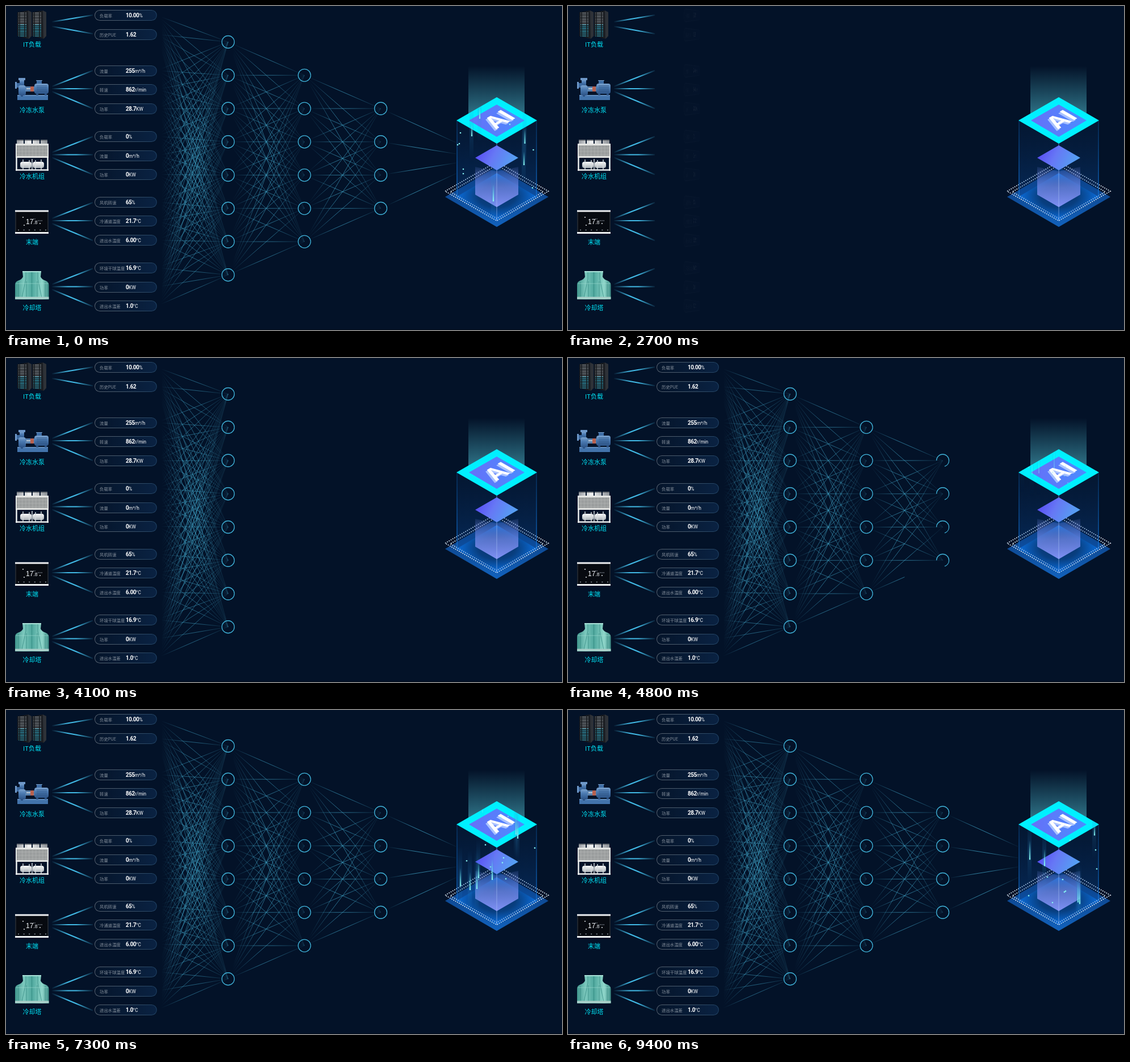
These frames come from a looping animation (980 px wide and 572 px high, 9500 ms). An HTML page:

```html
<!DOCTYPE html>
<html>
<head>
<meta charset="utf-8">
<style>
html, body { margin: 0; width: 100%; height: 100%; overflow: hidden; background: #031228; }
#stage { position: relative; width: 980px; height: 572px; overflow: hidden; }
svg { position: absolute; left: 0; top: 0; }
.pill {
  position: absolute; left: 156px; width: 108px; height: 17px; line-height: 17px;
  border: 1px solid transparent; border-radius: 10px; white-space: nowrap;
  background: linear-gradient(90deg, #05152b, #0a2242) padding-box,
              linear-gradient(90deg, #56616f, #44586b 50%, #1f4163) border-box;
}
.pill span { position: absolute; top: 0; }
.name { left: 8px; font: 300 7.4px/17px "Noto Sans CJK SC", "Noto Sans CJK", sans-serif; color: #87919d; }
.val { left: 54px; color: #fff; font: 700 10px/18px Roboto, sans-serif; letter-spacing: -.45px; }
.val i { font: 400 8.4px/18px Roboto, sans-serif; letter-spacing: 0; }
.cat { font: 500 11px "Noto Sans CJK SC", "Noto Sans CJK", sans-serif; fill: #00e3f6; text-anchor: middle; }
</style>
</head>
<body>
<div id="stage">
<svg id="art" width="980" height="572" viewBox="0 0 980 572">
  <defs>
    <linearGradient id="beam" x2="0" y2="1"><stop stop-color="#3a8ca0" stop-opacity="0"/><stop offset="1" stop-color="#3a8ca0" stop-opacity=".85"/></linearGradient>
    <linearGradient id="chip" x2="1" y2="0"><stop stop-color="#6670f8"/><stop offset="1" stop-color="#4a8cff"/></linearGradient>
    <linearGradient id="mid" x2="1" y2=".3"><stop stop-color="#5440f4"/><stop offset=".5" stop-color="#6678f5"/><stop offset="1" stop-color="#559ff2"/></linearGradient>
    <linearGradient id="cube" x2="0" y2="1"><stop stop-color="#6f86e8" stop-opacity=".12"/><stop offset=".5" stop-color="#7187e6" stop-opacity=".75"/><stop offset="1" stop-color="#7f90f4"/></linearGradient>
    <linearGradient id="wall" x2="0" y2="1"><stop stop-color="#0a3a78" stop-opacity=".12"/><stop offset="1" stop-color="#0a5fc8" stop-opacity=".4"/></linearGradient>
    <linearGradient id="edge" x2="0" y2="1"><stop stop-color="#0d5fae" stop-opacity=".5"/><stop offset="1" stop-color="#1380ee"/></linearGradient>
    <linearGradient id="base" x2="0" y2="1"><stop stop-color="#0a3470"/><stop offset="1" stop-color="#1262bd"/></linearGradient>
    <radialGradient id="floor"><stop stop-color="#06204a"/><stop offset=".45" stop-color="#07305f"/><stop offset="1" stop-color="#0b78ee"/></radialGradient>
    <linearGradient id="tail" x2="0" y2="1"><stop stop-color="#5fe8ee" stop-opacity="0"/><stop offset="1" stop-color="#8cfaf4"/></linearGradient>
    <linearGradient id="band" x2="0" y2="1"><stop stop-color="#2b8fd0" stop-opacity="0"/><stop offset=".5" stop-color="#2b8fd0" stop-opacity=".2"/><stop offset="1" stop-color="#2b8fd0" stop-opacity="0"/></linearGradient>
    <linearGradient id="teal"><stop stop-color="#3f958c"/><stop offset=".25" stop-color="#7cc8bd"/><stop offset=".5" stop-color="#4ea79d"/><stop offset=".8" stop-color="#8fd6ca"/><stop offset="1" stop-color="#3d8d86"/></linearGradient>
    <linearGradient id="steel" x2="0" y2="1"><stop stop-color="#7ba3cf"/><stop offset=".4" stop-color="#4c7bb2"/><stop offset="1" stop-color="#2c5386"/></linearGradient>
    <linearGradient id="tub"><stop stop-color="#9a9ea4"/><stop offset=".4" stop-color="#f2f3f4"/><stop offset="1" stop-color="#8e9298"/></linearGradient>
    <linearGradient id="tank" x2="0" y2="1"><stop stop-color="#fff"/><stop offset="1" stop-color="#a9b0b6"/></linearGradient>
    <pattern id="mesh" width="2.4" height="2.4" patternUnits="userSpaceOnUse"><rect width="2.4" height="2.4" fill="#b9bbba"/><rect width="1.4" height="1.4" fill="#6f7375"/></pattern>
    <clipPath id="prism"><path d="M865 161L936 202V337L865 379L794 337V202Z"/></clipPath>
    <g id="rack">
      <path d="M20 11L39 8L45 11V53L40 58L20 53Z" fill="#1b1e23"/>
      <path d="M39 8L45 11V53L40 58Z" fill="#2e3238"/>
      <path d="M29 12V33" stroke="#9fa6ab" stroke-width="14" stroke-dasharray=".9 2"/>
      <path d="M29 33V54" stroke="#2fa8c4" stroke-width="14" stroke-dasharray="1.1 1.8"/>
      <path d="M24 11V55M33 11V56" stroke="#14171b" stroke-width="1.5"/>
    </g>
  </defs>
  <path d="M0 571.5H980" stroke="#020b19"/>

  <use href="#rack"/><use href="#rack" x="26"/>

  <g>
    <rect x="20" y="157" width="54" height="9" fill="#4273ab"/><path d="M20 158H74" stroke="#82a8d2"/>
    <rect x="22" y="127" width="12" height="4" fill="#6d97c8"/><rect x="24" y="130" width="8" height="12" fill="url(#steel)"/>
    <rect x="16" y="134" width="3" height="12" fill="#6d97c8"/><rect x="19" y="136" width="8" height="8" fill="#3b689f"/>
    <rect x="22" y="140" width="13" height="18" rx="4" fill="url(#steel)"/>
    <rect x="34" y="142" width="16" height="9" fill="#5a82ae"/><rect x="43" y="142" width="6" height="9" rx="1" fill="#b9614f"/>
    <path d="M36 146H43" stroke="#b9c7d6" stroke-width="2"/>
    <rect x="54" y="131" width="9" height="6" fill="#3f6ea6"/><path d="M53 131.5H64" stroke="#7ba3cf"/>
    <rect x="50" y="137" width="25" height="18" rx="4" fill="url(#steel)"/>
    <path d="M54 141H72M54 144H72M54 147H72M54 150H72" stroke="#264c7c" stroke-width=".8"/>
    <path d="M55 155V158M70 155V158M28 157V160" stroke="#2c5386" stroke-width="4"/>
  </g>

  <g>
    <path d="M19 236H31V244H19ZM33 236H45V244H33ZM47 236H59V244H47ZM61 236H73V244H61Z" fill="url(#tub)"/>
    <path d="M19 237H31M33 237H45M47 237H59M61 237H73" stroke="#575c63" stroke-width="1.5"/>
    <rect x="17" y="243" width="58" height="25" fill="#e4e5e3"/><rect x="19" y="246" width="54" height="19" fill="url(#mesh)"/>
    <path d="M18.5 267V291M73.5 267V291M17 289.5H75" stroke="#eceeee" stroke-width="2.5"/>
    <rect x="25" y="275" width="20" height="11" rx="4" fill="url(#tank)"/><rect x="47" y="275" width="20" height="11" rx="4" fill="url(#tank)"/>
    <path d="M30 271V289M41 272V289M46 270V289M52 272V289M62 271V289" stroke="#d5dadd" stroke-width="1.5"/>
  </g>

  <g>
    <rect x="16" y="361" width="59" height="41" fill="#070a10"/>
    <path d="M16 362H75M16 400.5H75" stroke="#eef0f2" stroke-width="3"/>
    <path d="M17 364V399M74 364V399" stroke="#3b424c"/>
    <text x="35" y="385" fill="#f2f6fa" font-family="Liberation Sans, sans-serif" font-size="12">17<tspan font-size="8.5">.8</tspan></text>
    <path d="M56 379H64M48 376H52" stroke="#9aa4ae" stroke-dasharray="2 1"/>
    <path d="M29 373H31M31 387H33M59 384H61" stroke="#dfe6ec" stroke-width="1.5"/>
    <path d="M21 395.5H73" stroke="#8a939d" stroke-dasharray="2 7.6" stroke-width="1.5"/>
  </g>

  <g>
    <path d="M29 468H62L61 478Q63 483 70 485Q75 487 75.500 492V518H16V492Q16 487 21 485Q28 483 30 478Z" fill="url(#teal)"/>
    <path d="M29 469H62" stroke="#a9e2d8" stroke-width="2"/>
    <path d="M35 470V482L28 515M45.500 470V515M56 470V482L63 515M22 487V515M69 487V515M36 486V515M55 486V515" fill="none" stroke="#2f857d" stroke-width=".7"/>
    <path d="M17 490H75" stroke="#a0dbd1" stroke-width=".6"/>
    <path d="M16 515.500H75.500" stroke="#a9cfc9" stroke-width="4"/>
  </g>

  <g class="cat">
    <text x="46" y="72">IT负载</text><text x="46" y="188">冷冻水泵</text><text x="46" y="305">冷水机组</text>
    <text x="46" y="421">末端</text><text x="46" y="537">冷却塔</text>
  </g>

  <g id="fan" stroke-width="2.2"></g>
  <g id="net" fill="none"></g>

  <rect x="815" y="106" width="99" height="92" fill="url(#beam)"/>
  <path d="M865 284L956 337L865 390L774 337Z" fill="url(#base)"/>
  <path d="M865 295L936 337L865 379L794 337Z" fill="url(#floor)"/>
  <path d="M865 275L956 327L865 379L774 327Z M865 281L947 328L865 375L783 328Z" fill="none" stroke="#e8f4ff" stroke-width="1.7" stroke-dasharray="1.7 2"/>
  <path d="M794 202L865 243L936 202V337L865 379L794 337Z" fill="url(#wall)"/>
  <path d="M794.5 202H795.5V337H794.5ZM934.5 202H935.5V337H934.5Z" fill="url(#edge)"/>
  <path d="M827 284L865 292L903 284V333L865 355L827 333Z" fill="url(#cube)"/>
  <path d="M865 243V380" stroke="#a9c4f5" stroke-opacity=".6"/>
  <path d="M865 246L903 268L865 290L827 268Z" fill="url(#mid)"/>
  <path d="M865 161L936 202L865 243L794 202Z" fill="#00f0ff"/>
  <path d="M865 174L914 202L865 231L816 202Z" fill="url(#chip)"/>
  <g font-family="Liberation Sans, Arial, sans-serif" font-weight="700" font-size="43" text-anchor="middle">
    <text transform="matrix(.866 -.5 .866 .5 879 210.500)" fill="#a9c2ff">AI</text>
    <text transform="matrix(.866 -.5 .866 .5 881.500 207.500)" fill="#fff">AI</text>
  </g>
  <g id="rain" clip-path="url(#prism)"></g>
</svg>
</div>
<script>
const LOOP = 9500, STEP = 100, RESET = 1500;
const $ = id => document.getElementById(id);
const clamp = v => Math.max(0, Math.min(1, v));
const span = (t, start, dur) => clamp((t - start) / dur);

function add(tag, attrs, parent) {
  const el = document.createElementNS('http://www.w3.org/2000/svg', tag);
  for (const k in attrs) el.setAttribute(k, attrs[k]);
  return parent.appendChild(el);
}

// Horizontal stroke gradient that fades out at both ends
function fade(id, x1, x2, color, alpha) {
  const g = add('linearGradient', { id, gradientUnits: 'userSpaceOnUse', x1, x2, y1: 0, y2: 0 }, document.querySelector('defs'));
  [[0, 0], [.4, alpha], [.6, alpha], [1, .1]].forEach(([offset, a]) =>
    add('stop', { offset, 'stop-color': color, 'stop-opacity': a }, g));
}

const wires = [], rings = [];
function wire(parent, grad, x1, y1, x2, y2, start, dur) {
  const el = add('line', { x1, y1, x2, y2, stroke: `url(#${grad})` }, parent);
  wires.push({ el, x1, y1, x2, y2, start, dur });
}

// Pills: y, label, value, decimals, unit
const pills = [
  [16.5, '负载率', 10, 2, '%'], [50, '历史PUE', 1.62, 2, ''],
  [114, '流量', 255, 0, 'm³/h'], [147.5, '转速', 862, 0, 'r/min'], [181.5, '功率', 28.7, 1, 'KW'],
  [230, '负载率', 0, 0, '%'], [264, '流量', 0, 0, 'm³/h'], [297.5, '功率', 0, 0, 'KW'],
  [346, '风机转速', 65, 0, '%'], [379.5, '冷通道温度', 21.7, 1, '°C'], [413.5, '进出水温度', 6, 2, '°C'],
  [462, '环境干球温度', 16.9, 1, '°C'], [496, '功率', 0, 0, 'KW'], [529.5, '进出水温差', 1, 1, '°C']
].map(([y, name, value, digits, unit]) => {
  const el = document.createElement('div');
  el.className = 'pill';
  el.style.top = y - 9.5 + 'px';
  el.innerHTML = `<span class="name">${name}</span><span class="val"><b></b><i>${unit}</i></span>`;
  $('stage').appendChild(el);
  const turn = a => `translateX(13px) perspective(300px) rotateY(${a}deg) translateX(-13px)`;
  const flip = el.animate([
    { offset: 0, transform: turn(90), opacity: 0, easing: 'ease-in' },
    { offset: .4, transform: turn(-20), easing: 'ease-in' },
    { offset: .6, transform: turn(10), opacity: 1 },
    { offset: .8, transform: turn(-5) },
    { offset: 1, transform: turn(0), opacity: 1 }
  ], { duration: 1000, fill: 'both' });
  flip.pause();
  return { y, value, digits, flip, num: el.querySelector('b') };
});

// Fans from the devices to their pills
fade('gFan', 80, 153, '#45c3f0', .95);
const fan = (y, dy, end) => wire($('fan'), 'gFan', 81, y + dy, 153, end, RESET, 600);
fan(32, -4, 16); fan(32, 4, 49);
[146, 262.5, 379, 495.5].forEach(y => { fan(y, -4, y - 32); fan(y, 0, y + .01); fan(y, 5, y + 35); });

// Network
const column = (n, top) => Array.from({ length: n }, (_, i) => top + i * 58.75);
const layers = [
  { x: 266, ys: pills.map(p => p.y) },
  { x: 391.5, ys: column(8, 63.5), ring: 3850 },
  { x: 526, ys: column(6, 122.3), ring: 4300 },
  { x: 660.5, ys: column(4, 181), ring: 4625 }
];
const grow = [
  { start: 3520, lag: 20, dur: 90, alpha: .5 },
  { start: 4100, lag: 15, dur: 150, alpha: .55 },
  { start: 4500, lag: 20, dur: 180, alpha: .6 }
];
grow.forEach((g, n) => {
  const a = layers[n], b = layers[n + 1];
  fade('gNet' + n, a.x + 8, b.x - 9, '#41a9cd', g.alpha);
  a.ys.forEach((y1, i) => b.ys.forEach((y2, j) => {
    const late = n === 2 && i > 3 && i - j === 2;
    wire($('net'), 'gNet' + n, a.x, y1, b.x, y2, late ? 4700 : g.start + i * g.lag, late ? 200 : g.dur);
  }));
  b.ys.forEach(y => rings.push({
    start: b.ring,
    el: add('circle', { r: 11, pathLength: 1, stroke: '#3fb0d6', 'stroke-width': 1.3, transform: `translate(${b.x} ${y}) rotate(180)` }, $('net'))
  }));
});
fade('gOut', 672, 788, '#41a9cd', .7);
[241, 261, 277, 296].forEach((y, i) => wire($('net'), 'gOut', 660.5, layers[3].ys[i], 793, y, 4880, 250));

// Falling light: x, head y at the given moment, speed in px/s, tail length
const rain = [];
function drops(at, from, to, list) {
  list.forEach(([x, y, v, len]) => {
    const g = add('g', {}, $('rain'));
    if (len) {
      add('rect', { x: x - 4, y: -70, width: 7, height: 110, fill: 'url(#band)' }, g);
      add('rect', { x: x - 1.1, y: -len, width: 2.2, height: len, fill: 'url(#tail)' }, g);
    } else add('circle', { cx: x, r: 1.3, fill: '#86f3f2' }, g);
    rain.push({ g, y, v, at, from, to });
  });
}
drops(0, -600, RESET, [
  [801, 224, 30], [799, 243, 28], [796, 245, 25], [806, 288, 30], [806, 296, 27], [929.5, 254, 41], [888, 209, 24], [928, 321, 18],
  [821, 230, 45, 22], [835, 199, 43, 22], [914.5, 243, 45, 26], [913, 281, 50, 24], [859, 345, 45, 30]
]);
drops(6300, 4600, LOOP, [
  [812, 237, 29.3], [881, 267, 31], [932, 226, 17.6], [845, 211, 27], [877, 233, 28], [875, 245, 24.6],
  [854, 247, 30], [872, 138, 52], [885, 168, 20], [930, 120, 41],
  [801, 266, 45, 32], [818, 273, 45, 32], [830, 271, 45, 36], [833, 249, 48, 28], [857, 258, 42, 36],
  [814, 131, 43, 34], [899, 163, 57, 36], [902, 172, 55, 34], [840, 136, 45, 30], [928, 82, 45, 18]
]);

function draw(t) {
  const clock = t < RESET ? LOOP : t;
  for (const w of wires) {
    const p = span(clock, w.start, w.dur);
    w.el.style.display = p ? '' : 'none';
    w.el.setAttribute('x2', w.x1 + (w.x2 - w.x1) * p);
    w.el.setAttribute('y2', w.y1 + (w.y2 - w.y1) * p);
  }
  for (const r of rings) {
    const p = span(clock, r.start, 250);
    r.el.style.display = p ? '' : 'none';
    r.el.setAttribute('stroke-dasharray', p < 1 ? `${p} 2` : 'none');
  }
  const c = span(clock, 1650, 2000);
  const count = c < 1 ? (1 - 2 ** (-10 * c)) * 1024 / 1023 : 1;
  for (const p of pills) {
    p.flip.currentTime = Math.max(0, Math.min(1000, clock - 2585));
    p.num.textContent = (p.value * count).toFixed(p.digits);
  }
  for (const d of rain) {
    const y = d.y + d.v * (t - d.at) / 1000;
    const on = t < d.to ? span(t, d.from, 600) : 0;
    d.g.setAttribute('transform', `translate(0 ${y})`);
    d.g.setAttribute('opacity', on * span(y, 178, 14) * (1 - span(y, 345, 18)));
  }
}

let last = -1;
const began = performance.now();
function tick() {
  const t = Math.floor((performance.now() - began) % LOOP / STEP) * STEP;
  if (t !== last) draw(last = t);
  requestAnimationFrame(tick);
}
tick();
</script>
</body>
</html>
```
